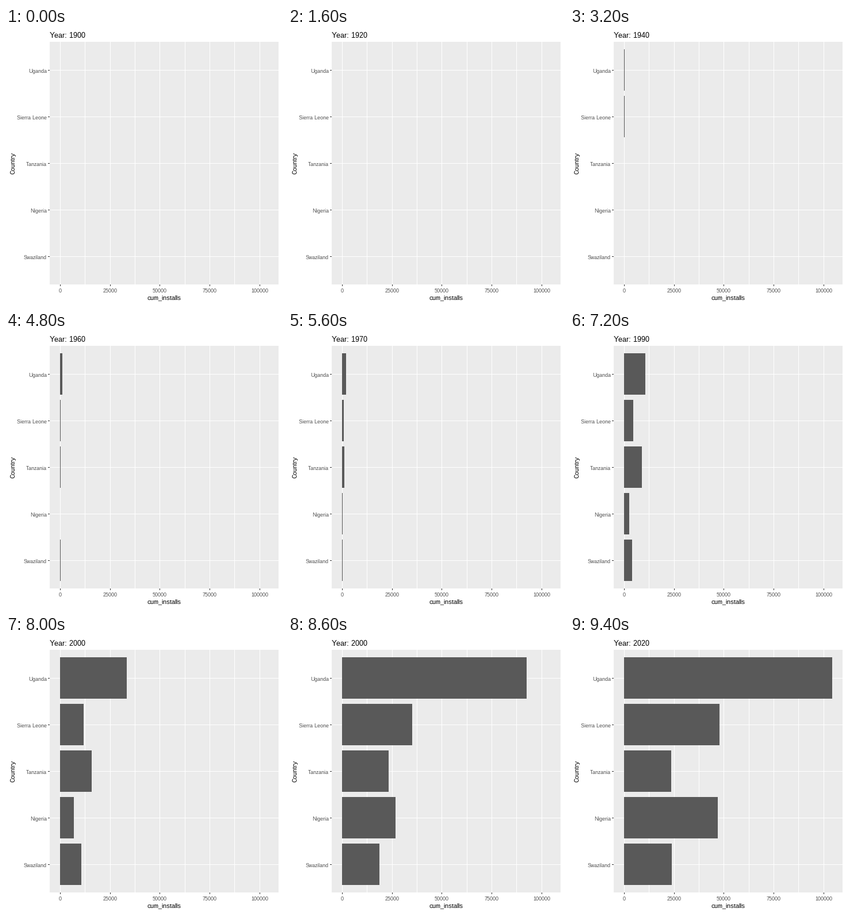
A matplotlib script that plays this animation: 480x480 px, repeating every 10 s.

```python
import matplotlib.pyplot as plt
import numpy as np
from matplotlib.animation import FuncAnimation
from matplotlib.patches import Rectangle

plt.rcParams.update({
    "font.family": "Liberation Sans",
    "text.hinting": "native",
    "text.hinting_factor": 1,
    "toolbar": "None",
})

SIZE, DPI = 480, 72
FRAMES, STEP_MS = 100, 100
LEFT, TOP, RIGHT, BOTTOM = 76, 24, 474, 446
X0, PX_PER_UNIT = 93.9, 346.7 / 100000
ROW0, ROW_STEP, BAR_H = 73, 81, 72

# First year and its installs, then the totals at KEY_YEARS.
KEY_YEARS = [1980, 2000, 2010, 2020]
GROWTH = {
    "Uganda": (1940, 380, 3490, 33500, 92600, 104400),
    "Sierra Leone": (1940, 100, 1760, 11850, 35200, 47900),
    "Tanzania": (1960, 250, 4930, 15900, 23400, 23700),
    "Nigeria": (1970, 100, 900, 6950, 26850, 47050),
    "Swaziland": (1950, 30, 1470, 10700, 18800, 24000),
}

fig = plt.figure(figsize=(SIZE / DPI, SIZE / DPI), dpi=DPI, facecolor="white")
ax = fig.add_axes([0, 0, 1, 1])
ax.set_xlim(0, SIZE)
ax.set_ylim(SIZE, 0)
ax.axis("off")


def box(x, y, w, h, color, z=1):
    return ax.add_patch(Rectangle((x, y), w, h, fc=color, lw=0,
                                  antialiased=False, zorder=z))


def label(x, y, text, size, color="black", ha="center", **kw):
    return ax.text(x, y, text, size=size, color=color, ha=ha,
                   va="baseline", **kw)


def to_px(value):
    return round(X0 + value * PX_PER_UNIT)


def installs(country, year):
    """Exponential growth between the key years."""
    start, *totals = GROWTH[country]
    if year < start:
        return 0
    return np.exp(np.interp(year, [start, *KEY_YEARS], np.log(totals)))


def year_at(frame):
    """Eight frames per decade, seven for the last ones."""
    return 1900 + 10 * max(frame // 8, (frame - 10) // 7)


box(LEFT, TOP, RIGHT - LEFT, BOTTOM - TOP, "#EBEBEB", 0)

for value in range(0, 100001, 12500):
    x = to_px(value)
    box(x, TOP, 1, BOTTOM - TOP, "white")
    if value % 25000 == 0:
        box(x, BOTTOM, 1, 3, "#333333")
        label(x, 460, str(value), 9, "#4D4D4D")

bars = {}
for i, country in enumerate(GROWTH):
    y = ROW0 + ROW_STEP * i
    box(LEFT, y, RIGHT - LEFT, 1, "white")
    box(LEFT - 3, y, 3, 1, "#333333")
    label(71, y + 5, country, 9, "#4D4D4D", ha="right")
    bars[country] = box(to_px(0), y - BAR_H // 2, 0, BAR_H, "#595959", 2)

label(275, 472, "cum_installs", 11)
label(15, 235, "Country", 11, rotation=90, rotation_mode="anchor")
title = label(LEFT, 17, "", 13, ha="left")


def draw(frame):
    # Bars switch one frame ahead of the title.
    year = year_at(frame + 1)
    for country, bar in bars.items():
        value = installs(country, year)
        bar.set_visible(value > 0)
        bar.set_width(max(1, to_px(value) - to_px(0)))
    title.set_text(f"Year: {year_at(frame)}")
    return [*bars.values(), title]


anim = FuncAnimation(fig, draw, frames=FRAMES, interval=STEP_MS,
                     init_func=lambda: draw(0), repeat=True, repeat_delay=0)
plt.show()
```
